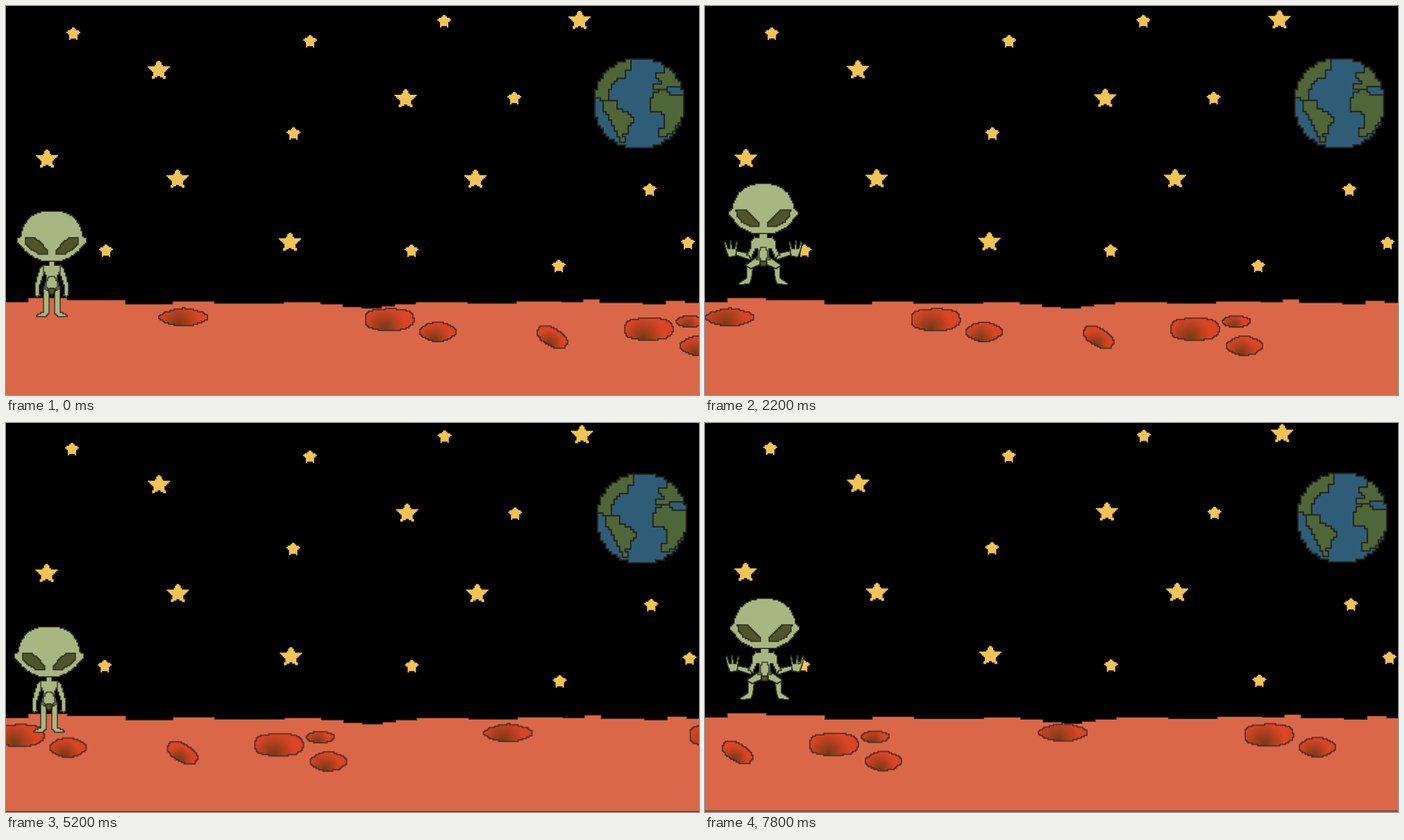
An HTML page with a canvas that plays this animation: 998 by 561 pixels, repeating every 8 s.

```html
<!DOCTYPE html>
<html lang="en">
<head>
<meta charset="utf-8">
<title>Alien walk</title>
<style>
html, body { margin: 0; width: 100%; height: 100%; overflow: hidden; background: #000; }
canvas { display: block; }
</style>
</head>
<body>
<canvas id="stage" width="998" height="561"></canvas>
<script>
const W = 998, H = 561, STEP = 200, LOOP = 8000, LAP = 1000;
const INK = '#23231c', SKIN = '#a9b681', EYE = '#4f5529';
const GOLD = '#f2c355', SOIL = '#da6848', SEA = '#2f5d78', LAND = '#4f6638';
const ctx = document.getElementById('stage').getContext('2d');

function layer(w, h, draw) {
  const c = document.createElement('canvas');
  c.width = w;
  c.height = h;
  draw(c.getContext('2d'));
  return c;
}

const parse = s => s.split(' ').map(p => p.split(',').map(Number));
const trace = pts => new Path2D('M' + pts.map(p => p.join(',')).join('L') + 'Z');
const flip = (pts, axis) => pts.map(([x, y]) => [2 * axis - x, y]);
const whole = (half, axis) => [...half, ...flip(half, axis).reverse()];
const shift = (pts, dx, dy) => pts.map(([x, y]) => [x + dx, y + dy]);

// Fills a polygon as square cells, with an optional stepped outline.
function pix(g, pts, cell, fill, line = 0, mask = null) {
  const path = trace(pts), limit = mask && trace(mask);
  const hit = (x, y) => {
    const px = x + cell / 2, py = y + cell / 2;
    return g.isPointInPath(path, px, py) && (!limit || g.isPointInPath(limit, px, py));
  };
  const xs = pts.map(p => p[0]), ys = pts.map(p => p[1]);
  const snap = v => Math.floor(v / cell) * cell;
  const h = line / 2, edges = [];
  g.fillStyle = fill;
  for (let y = snap(Math.min(...ys)); y < Math.max(...ys); y += cell) {
    for (let x = snap(Math.min(...xs)); x < Math.max(...xs); x += cell) {
      if (!hit(x, y)) continue;
      g.fillRect(x, y, cell, cell);
      if (!hit(x - cell, y)) edges.push([x - h, y - h, line, cell + line]);
      if (!hit(x + cell, y)) edges.push([x + cell - h, y - h, line, cell + line]);
      if (!hit(x, y - cell)) edges.push([x - h, y - h, cell + line, line]);
      if (!hit(x, y + cell)) edges.push([x - h, y + cell - h, cell + line, line]);
    }
  }
  if (!line) return;
  g.fillStyle = INK;
  edges.forEach(e => g.fillRect(...e));
}

function ring(cx, cy, n, radius) {
  return Array.from({ length: n }, (_, i) => {
    const a = i * 2 * Math.PI / n - Math.PI / 2, r = radius(i);
    return [cx + r * Math.cos(a), cy + r * Math.sin(a)];
  });
}

// Sky
const star = r => layer(40, 40, g =>
  pix(g, ring(20, 20 + r * 0.1, 10, i => i % 2 ? r * 0.52 : r), 2, GOLD));
const stars = [
  { img: star(12), spots: parse('97,39 438,50 631,21 414,183 732,132 927,264 144,352 584,352 796,374 982,341'), dx: 0, rise: 0.11 },
  { img: star(16.5), spots: parse('220,91 59,219 247,248 409,339 575.5,132 676,248 826,19'), dx: 0.07, rise: 0.17 }
];

const earth = layer(144, 144, g => {
  const disc = ring(72, 72, 60, () => 65.5);
  pix(g, disc, 4, SEA, 2);
  [
    '0,0 58,0 58,22 50,26 50,34 40,38 34,44 32,52 26,56 26,68 10,64 0,64',
    '22,70 38,70 42,79 56,85 63,91 63,100 56,106 55,114 49,118 54,128 46,126 40,116 36,106 27,90 22,84',
    '93,55 110,53 115,59 144,60 144,84 132,97 123,110 112,119 102,118 102,109 109,104 108,87 90,82 88,68',
    '107,18 144,18 133,47 115,46 110,52 92,52 93,44 105,42 97,36 97,29 106,27'
  ].forEach(s => pix(g, parse(s), 4, LAND, 2, disc));
});

// Alien
const headHalf = parse('66,296 54,296 46,298 38,302 31,308 26,316 23,324 22,331 17,335 17,341 22,346 27,353 33,358 41,363 51,367 66,368');
const eye = parse('27,334 41,334 50,341 59,352 60,358 47,357 35,350 28,342');

function pair(g, pts, axis, cell = 2, fill = SKIN) {
  pix(g, pts, cell, fill, 1);
  pix(g, flip(pts, axis), cell, fill, 1);
}

function head(g, dx, dy) {
  pix(g, whole(shift(headHalf, dx, dy), 66 + dx), 2, SKIN, 1);
  pair(g, shift(eye, dx, dy), 66 + dx, 2, EYE);
}

const leg = parse('54,405 62,405 63,420 62,443 58,448 44,449 43,446 54,441');
const raisedLeg = parse('69,405 78,405 84,416 89,416 89,436 100,443 99,446 86,445 80,440 80,421 70,414');
const arm = parse('56,374 50,376 46,386 42,403 42,417 45,420 49,417 48,405 52,392 56,384');
const torso = parse('62,369 61,374 55,375 54,383 58,390 57,398 55,407 62,411 66,411');
const belly = parse('66,390 62,390 57,400 60,409 66,409');

const onFoot = raised => layer(160, 460, g => {
  pix(g, leg, 2, SKIN, 1);
  pix(g, raised ? raisedLeg : flip(leg, 66), 2, SKIN, 1);
  pair(g, arm, 66);
  pix(g, whole(torso, 66), 2, SKIN, 1);
  pix(g, whole(belly, 66), 2, SKIN, 1);
  pix(g, whole(parse('66,407 61,408 62,414 66,417'), 66), 1, EYE, 1);
  head(g, 0, 0);
});

const leap = layer(180, 460, g => {
  pair(g, parse('64,357 44,353 44,359 65,366'), 84, 1);
  pair(g, parse('30,352 28,341 30,339 33,350 36,350 36,338 38,338 39,350 43,350 45,339 47,340 45,354 44,361 34,362'), 84, 1);
  pair(g, parse('60,375 69,378 67,394 64,401 49,402 48,400 60,392'), 84, 1);
  pair(g, parse('76,361 58,374 66,379 83,371 84,362'), 84, 1);
  pix(g, whole(parse('79,329 79,334 71,333 66,340 66,348 61,359 67,363 72,351 76,349 77,358 75,365 84,369'), 84), 2, SKIN, 1);
  pix(g, whole(parse('84,349 80,349 77,358 80,367 84,367'), 84), 2, SKIN, 1);
  pix(g, whole(parse('84,368 79,368 80,375 84,375'), 84), 1, EYE, 1);
  head(g, 18, -39);
});
const stand = onFoot(false), stride = onFoot(true);

// Craters: uneven superellipses; a low power gives pointed ends
let seed = 7;
const random = () => (seed = seed * 16807 % 2147483647) / 2147483647;

function crater(x, y, w, h, power, tilt = 0) {
  const bend = v => Math.sign(v) * Math.abs(v) ** (2 / power);
  const pts = Array.from({ length: 20 }, (_, i) => {
    const a = i * Math.PI / 10, r = 0.97 + random() * 0.06;
    const px = bend(Math.cos(a)) * r * w / 2, py = bend(Math.sin(a)) * r * h / 2;
    return [40 + px * Math.cos(tilt) - py * Math.sin(tilt), 20 + px * Math.sin(tilt) + py * Math.cos(tilt)];
  });
  const img = layer(80, 40, g => {
    const gx = 40 - w * 0.1, gy = 20 + h * 0.4;
    const shade = g.createRadialGradient(gx, gy, 1, gx, gy, w * 0.42);
    shade.addColorStop(0, '#7c3a16');
    shade.addColorStop(1, '#d94526');
    pix(g, pts, 2, shade, 1);
  });
  return { x, y, w, img };
}

const craters = [
  crater(256, 449, 72, 26, 1.6),
  crater(552, 452, 70, 31, 2.7),
  crater(622, 470, 54, 28, 1.7),
  crater(787, 477.5, 47, 25, 2.3, 0.5),
  crater(925, 466, 70, 32, 2.7),
  crater(985, 455, 40, 16, 2.2),
  crater(997, 490, 54, 28, 1.7)
];

// Each pair is where a ledge starts and its height.
const ground = new Path2D('M-5,562' + parse(
  '-5,427 32,421 88,424 172,430 240,426 300,429 400,427 453,430 485,434 512,436 541,433 560,430 ' +
  '590,427 665,429 735,426 800,427 831,423 855,428 917,430 950,425 978,428'
).map(([x, y]) => `H${x}V${y}`).join('') + 'H1010V562Z');

// Walks and leaps take turns: steps, distance covered
const LEGS = [[6, 110], [4, 110], [6, 110], [4, 110], [10, 185], [8, 115]];

// Distance walked, and lift: 0 on foot, 1 at the height of a leap
function journey(c) {
  let far = 0, i = 0;
  while (i < LEGS.length - 1 && c >= LEGS[i][0]) {
    c -= LEGS[i][0];
    far += LEGS[i++][1];
  }
  const u = c / LEGS[i][0];
  return { far: far + u * LEGS[i][1], lift: i % 2 ? u : i ? 1 - u : 0 };
}

function draw(c) {
  const { far, lift } = journey(c);
  const zoom = 1 + c * 0.0002;
  ctx.setTransform(1, 0, 0, 1, 0, 0);
  ctx.fillStyle = '#000';
  ctx.fillRect(0, 0, W, H);

  for (const { img, spots, dx, rise } of stars) {
    for (const [x, y] of spots) {
      ctx.drawImage(img, W / 2 + (x - W / 2) * zoom + dx * c - 20, y - rise * c + lift - 20);
    }
  }
  ctx.drawImage(earth, 840 + 0.15 * c, 68.5 - 0.13 * c + lift);

  const dy = lift - 0.09 * c;
  ctx.fillStyle = SOIL;
  ctx.fillRect(0, 500, W, H - 500);
  ctx.setTransform(1 + c * 0.0001, 0, 0, 1, 0, dy);
  ctx.fill(ground);
  ctx.strokeStyle = '#4a2418';
  ctx.stroke(ground);
  ctx.setTransform(1, 0, 0, 1, 0, 0);

  for (const { x, y, w, img } of craters) {
    const px = x - far;
    ctx.drawImage(img, px - 40, y + dy - 20);
    if (px < w / 2) ctx.drawImage(img, px + LAP - 40, y + dy - 20);
  }

  const ax = Math.round(-4.5 * Math.sin(c * Math.PI / 40)), ay = Math.round(-0.1 * c);
  if (lift > 0.55) ctx.drawImage(leap, ax + 3, ay + 1);
  else ctx.drawImage(c % 4 < 2 ? stand : stride, ax, ay);
}

const start = performance.now();
function tick() {
  const n = Math.floor(((performance.now() - start) % LOOP) / STEP);
  draw(n < 4 ? n : n - 1); // one pose is held for two beats
  requestAnimationFrame(tick);
}
tick();
</script>
</body>
</html>
```
